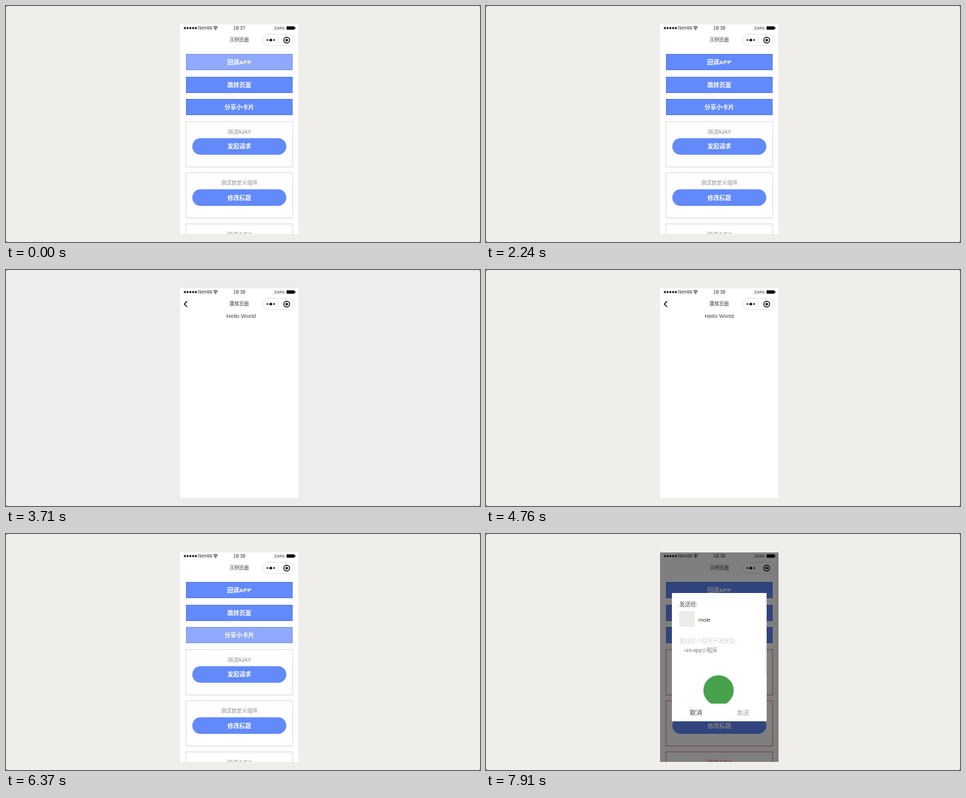
Write an HTML page with a canvas that moves like this. It is 640 by 320 pixels and loops after 8000 ms.

```html
<!DOCTYPE html>
<html>
<head>
<meta charset="utf-8">
<style>
html, body { margin: 0; width: 100%; height: 100%; overflow: hidden; background: #444; }
canvas { display: block; width: 640px; height: 320px; }
</style>
</head>
<body>
<canvas id="stage"></canvas>
<script>
const LOOP = 8000;
const BLUE = '#638afb', PRESSED = '#8fa9fd';
const canvas = document.getElementById('stage');
const ctx = canvas.getContext('2d');
const scale = window.devicePixelRatio || 1;
canvas.width = 640 * scale;
canvas.height = 320 * scale;

const within = (t, from, to) => t >= from && t < to;
const easeOut = p => { p = Math.min(1, Math.max(0, p)); return 1 - (1 - p) ** 2; };

function rect(x, y, w, h, color) {
  ctx.fillStyle = color;
  ctx.fillRect(x, y, w, h);
}

function round(x, y, w, h, r, fill, stroke, width = 1) {
  ctx.beginPath();
  ctx.roundRect(x, y, w, h, r);
  if (fill) { ctx.fillStyle = fill; ctx.fill(); }
  if (stroke) { ctx.strokeStyle = stroke; ctx.lineWidth = width; ctx.stroke(); }
}

function dot(x, y, r, color = '#111') {
  ctx.beginPath();
  ctx.arc(x, y, r, 0, 7);
  ctx.fillStyle = color;
  ctx.fill();
}

// y is the vertical middle of the glyphs
function text(str, x, y, size, color, align = 'center', weight = 400) {
  ctx.font = `${weight} ${size}px "Liberation Sans", "Noto Sans CJK SC", "Noto Sans CJK", sans-serif`;
  ctx.textAlign = align;
  ctx.fillStyle = color;
  ctx.fillText(str, x, y + size * 0.37);
}

function clipped(x, y, w, h, draw) {
  ctx.save();
  ctx.beginPath();
  ctx.rect(x, y, w, h);
  ctx.clip();
  draw();
  ctx.restore();
}

function statusBar(time) {
  for (let i = 0; i < 5; i++) dot(241.5 + i * 3.7, 30, 1.4);
  text('Nemtik', 259, 30, 6.3, '#333', 'left');
  ctx.strokeStyle = '#222';
  ctx.lineWidth = 0.8;
  for (const r of [1.8, 3.2, 4.6]) {
    ctx.beginPath();
    ctx.arc(283, 32.2, r, -Math.PI * 0.75, -Math.PI * 0.25);
    ctx.stroke();
  }
  dot(283, 32, 0.7);
  text(time, 315, 30, 6.4, '#333');
  text('100%', 376, 30, 5.6, '#333', 'right');
  round(378.8, 27.6, 11, 4.6, 1, '#111');
  rect(390.2, 29, 1, 1.8, '#111');
}

function navBar(title, hasBack) {
  text(title, 315, 46, 6.5, '#333');
  if (hasBack) {
    ctx.beginPath();
    ctx.moveTo(244.5, 42.3);
    ctx.lineTo(240.8, 46.2);
    ctx.lineTo(244.5, 50.1);
    ctx.strokeStyle = '#111';
    ctx.lineWidth = 1.3;
    ctx.stroke();
  }
  round(346.5, 38.5, 43.5, 15, 7.5, null, '#e2e2e2', 0.8);
  dot(353, 46.2, 1.1);
  dot(357.5, 46.2, 1.9);
  dot(362, 46.2, 1.1);
  ctx.beginPath();
  ctx.arc(379, 46.2, 3.9, 0, 7);
  ctx.strokeStyle = '#111';
  ctx.lineWidth = 1.3;
  ctx.stroke();
  dot(379, 46.2, 1.8);
}

function button(label, y, pressed) {
  rect(243, y, 144, 22, pressed ? PRESSED : BLUE);
  ctx.strokeStyle = 'rgba(0,0,0,.2)';
  ctx.lineWidth = 0.5;
  ctx.strokeRect(243.25, y + 0.25, 143.5, 21.5);
  text(label, 315, y + 11, 8, '#fff', 'center', 700);
}

function card(title, label, y, dim) {
  ctx.strokeStyle = dim ? '#f08a8a' : '#dcdcda';
  ctx.lineWidth = 1;
  ctx.strokeRect(243, y, 144, 61.5);
  text(title, 315, y + 13.5, 7.1, dim ? '#f05858' : '#8c8685');
  if (label) {
    round(251.5, y + 22.5, 127, 22.5, 11.25, BLUE);
    text(label, 315, y + 33.7, 8, '#fff', 'center', 700);
  }
}

function mainPage(pressed, dim) {
  ['回调APP', '跳转页面', '分享小卡片'].forEach((label, i) =>
    button(label, [65, 96, 126][i], pressed === i));
  card('测试AJAX', '发起请求', 156.8, dim);
  card('测试自定义组件', '修改标题', 226, dim);
  card('测试VUEX', '', 295.5, dim);
}

function dialog(loaded) {
  const top = loaded ? 80 : 94;
  const bottom = loaded ? 254 : 240;
  round(251, top, 128, bottom - top, 1, '#fff');
  text('发送给:', 261, top + 15, 7.5, '#555', 'left', 500);
  rect(261, top + 24.5, 21, 21.5, '#ecebe8');
  text('mole', 287, top + 36, 7.5, '#444', 'left');
  text('最好的小程序开发框架!', 261, top + 65.5, 7.5, '#d4d4d0', 'left');
  text('uni-app小程序', loaded ? 268 : 293, top + 77.5, 7, '#777', 'left');
  if (loaded) {
    clipped(251, top, 128, 150, () => dot(314, 212, 20.5, '#47a24b'));
    rect(377, top, 1.5, 111, '#e6e6e4');
  } else {
    text('小程序', 293, 196, 5.8, '#cfcfcb', 'left');
  }
  text('取消', 283.5, bottom - 12.5, 8.5, '#444');
  text('发送', 347, bottom - 12.5, 8.5, '#a0a09a');
}

function draw(t) {
  ctx.setTransform(scale, 0, 0, scale, 0, 0);
  ctx.clearRect(0, 0, 640, 320);
  const cool = within(t, 3360, 4760) || within(t, 5110, 6300);
  round(0, 0, 640, 320, 2, cool ? '#eeedec' : '#efeeea');

  const pressed = t < 280 ? 0
    : within(t, 2520, 3800) ? 1
    : within(t, 6300, 6790) ? 2 : -1;
  const second = within(t, 3150, 5110);
  const dim = t >= 6440;

  rect(235, 25, 160, 284, '#fff');
  statusBar(t < 70 ? '18:37' : '18:38');
  navBar(second ? '跳转页面' : '示例页面', second);

  clipped(235, 57, 160, 252, () => {
    mainPage(pressed, dim);
    // second page slides over the first, then back out
    const shift = t < 5110
      ? 160 * (1 - easeOut((t - 3360) / 400))
      : 160 * easeOut((t - 5110) / 400);
    if (shift < 160) {
      rect(235 + shift, 57, 160, 252, '#fff');
      text('Hello World', 315 + shift, 62, 7.7, '#444');
    }
  });

  if (dim) {
    rect(235, 25, 160, 284, 'rgba(0,0,0,.5)');
    dialog(t >= 6860);
  }
}

const start = performance.now();
function frame() {
  draw((performance.now() - start) % LOOP);
  requestAnimationFrame(frame);
}
frame();
</script>
</body>
</html>
```
